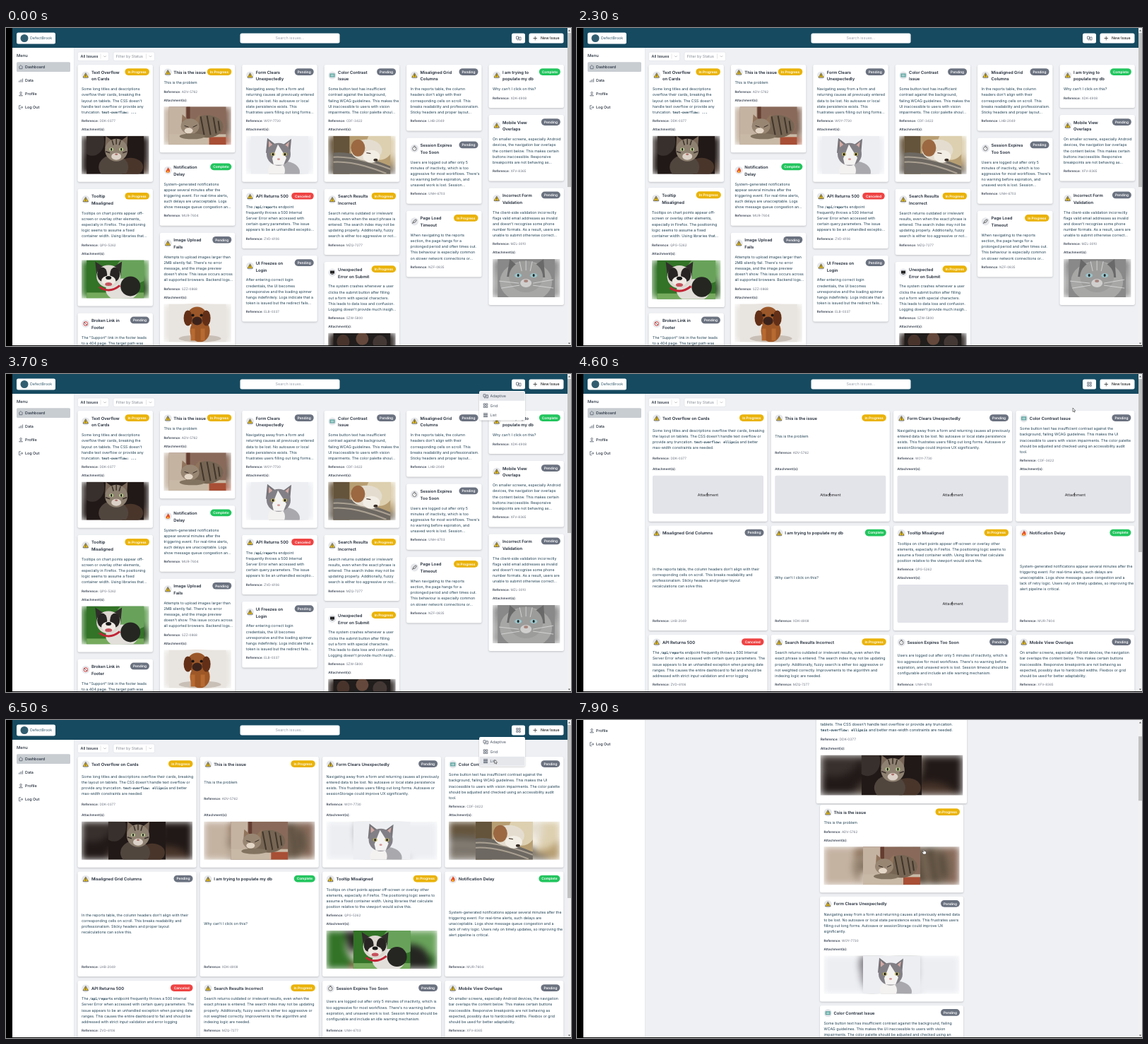
Write an HTML page that moves like this. It is 800x450 px and loops after 8 s.

```html
<!DOCTYPE html>
<html lang="en">
<head>
<meta charset="utf-8">
<title>Issue dashboard</title>
<style>
html, body { margin: 0; width: 100%; height: 100%; overflow: hidden; background: #000; }
svg { display: block; }
text { font-family: Inter, "Open Sans", sans-serif; text-rendering: geometricPrecision; white-space: pre; }
.mono { font: bold 4.6px "DejaVu Sans Mono", monospace; }
.box { fill: #fff; filter: drop-shadow(0 1px 1.2px #0003); }
.blur { filter: blur(5px); }
</style>
</head>
<body>
<script>
const INK = '#1d3f52', DARK = '#1f2937';
const rect = (x, y, w, h, fill, more = '') =>
  `<rect x="${x}" y="${y}" width="${w}" height="${h}" fill="${fill}" ${more}/>`;
const oval = (x, y, rx, ry, fill) => `<ellipse cx="${x}" cy="${y}" rx="${rx}" ry="${ry}" fill="${fill}"/>`;
const path = (d, fill) => `<path d="${d}" fill="${fill}"/>`;
const line = (d, color = '#4b5563', width = .7) =>
  `<path d="${d}" fill="none" stroke="${color}" stroke-width="${width}"/>`;
const text = (x, y, s, size, fill = DARK, weight = 400, anchor = 'start') =>
  `<text x="${x}" y="${y + size * .36}" font-size="${size}" fill="${fill}" font-weight="${weight}" text-anchor="${anchor}">${s}</text>`;
const at = (x, y, s) => `<g transform="translate(${x} ${y})">${s}</g>`;

// title, text, reference, status, icon, photo; breaks: | adaptive, ^ grid, ~ list, … adaptive cut
const issues = [
  ['Text Overflow |on Cards', "Some long titles and descriptions |overflow their cards, breaking ^the |layout on ~tablets. The CSS doesn't |handle text overflow or ^provide any |truncation. ~`text-overflow: …ellipsis` and better ^max-width constraints are needed.", 'DDK-0377', 'I', 'warn', 'tabby'],
  ['This is the issue', 'This is the problem', 'ADV-5762', 'I', 'warn', 'kitten'],
  ['Form Clears |Unexpectedly', 'Navigating away from a form and |returning causes all previously ^entered |data ~to be lost. No autosave or local |state persistence ^exists. This |frustrates users ~filling out long forms…. Autosave or ^sessionStorage could improve UX ~significantly.', 'WOY-7730', 'P', 'warn', 'white'],
  ['Color Contrast |Issue', 'Some button text has insufficient |contrast against the ^background, |failing ~WCAG guidelines. This makes the |UI ^inaccessible to users with vision |~impairments. The color palette ^shoul…d be adjusted and checked using an ~accessibility audit ^tool.', 'CDF-3422', 'P', 'board', 'sleeper'],
  ['Misaligned Grid |Columns', "In the reports table, the column |headers don't align with their ^|corresponding cells on scroll. This |breaks readability and ^professionalism. |Sticky headers and proper layout… ^recalculations can solve this.", 'LHB-2049', 'P', 'warn'],
  ['I am trying to |populate my db', "Why can't I click on this?", 'XDK-4908', 'C', 'warn'],
  ['Tooltip |Misaligned', 'Tooltips on chart points appear off-|screen or overlay other ^elements, |especially in Firefox. The positioning |logic seems to ^assume a fixed |container width. Using libraries that… calculate ^position relative to the viewport would solve this.', 'QPG-5262', 'I', 'warn', 'bulldog'],
  ['Notification |Delay', 'System-generated notifications |appear several minutes after the ^|triggering event. For real-time alerts, |such delays are ^unacceptable. Logs |show message queue congestion an…d a ^lack of retry logic. Users rely on timely updates, so improving the ^alert pipeline is critical.', 'MUR-7604', 'C', 'fire'],
  ['API Returns 500', 'The `/api/reports` endpoint |frequently throws a 500 Internal ^|Server Error when accessed with |certain query parameters. The ^issue |appears to be an unhandled exceptio…n when parsing date ^ranges. This causes the entire dashboard to fail and should be ^addressed with strict input validation and error logging', 'ZVD-6106', 'X', 'warn'],
  ['Search Results |Incorrect', 'Search returns outdated or irrelevant |results, even when the ^exact phrase is |entered. The search index may not be |updating ^properly. Additionally, fuzzy |search is either too aggressive or ^not… weighted correctly. Improvements to the algorithm and ^indexing logic are needed.', 'MZQ-7277', 'I', 'warn'],
  ['Session Expires |Too Soon', "Users are logged out after only 5 |minutes of inactivity, which is ^too |aggressive for most workflows. There's |no warning before ^expiration, and |unsaved work is lost. Session… timeout should be ^configurable and include an idle warning mechanism.", 'UNH-6703', 'P', 'clock'],
  ['Mobile View |Overlaps', 'On smaller screens, especially Android |devices, the navigation ^bar overlaps |the content below. This makes certain |buttons ^inaccessible. Responsive |breakpoints are not behaving as… ^expected, possibly due to hardcoded widths. Flexbox or grid ^should be used for better adaptability.', 'XFV-8365', 'P', 'warn'],
  ['Image Upload |Fails', "Attempts to upload images larger than |2MB silently fail. There's no error |message, and the image preview |doesn't show. This issue occurs across |all supported browsers. Backend logs…", 'SZZ-0868', 'P', 'warn', 'puppy'],
  ['UI Freezes on |Login', 'After entering correct login |credentials, the UI becomes |unresponsive and the loading spinner |hangs indefinitely. Logs indicate that a |token is issued but the redirect fails…', 'ELB-0337', 'P', 'warn'],
  ['Page Load |Timeout', 'When navigating to the reports |section, the page hangs for a |prolonged period and often times out. |This behaviour is especially common |on slower network connections or…', 'NZF-0835', 'I', 'pen'],
  ['Incorrect Form |Validation', "The client-side validation incorrectly |flags valid email addresses as invalid |and doesn't recognise some phone |number formats. As a result, users are |unable to submit otherwise correct…", 'MZL-3010', 'P', 'warn', 'grey'],
  ['Broken Link in |Footer', 'The "Support" link in the footer leads |to a 404 page. The target path was |moved', 'BLF-4040', 'P', 'ban'],
  ['Unexpected |Error on Submit', "The system crashes whenever a user |clicks the submit button after filling |out a form with special characters. |This leads to data loss and confusion. |Logging doesn't provide much insigh…", 'SZW-5800', 'I', 'screen', 'group'],
];
const statuses = {
  I: ['In Progress', '#eab308', 34.5], P: ['Pending', '#6b7280', 27],
  C: ['Complete', '#22c55e', 30], X: ['Canceled', '#ef4444', 31.5],
};
const icons = {
  warn: '<path d="M0-3.3L3.6 3H-3.6Z" fill="#facc15" stroke="#444" stroke-width=".7"/>' + rect(-.4, -1.3, .8, 2.3, '#222') + rect(-.4, 1.5, .8, .8, '#222'),
  fire: path('M0-4C3-1 3 0 2.6 2 2 4-2 4-2.6 2-3 0-1 0 0-4', '#ea4a1f') + oval(0, 2, 1.2, 1.5, '#fbbf24'),
  board: rect(-3.5, -2.5, 7, 5, '#4b9a94') + rect(-2.4, -1.3, 4.8, 1, '#d5eceb') + rect(-2.4, .4, 4.8, 1, '#d5eceb'),
  clock: '<circle r="2.7" cy=".4" fill="#fff" stroke="#555" stroke-width=".8"/>' + line('M0 .4L1.2-.7M-1-3.3H1', '#333'),
  pen: line('M-3 3L-1-1 2-3 3-2 1 1-2 2', '#555', .9),
  ban: '<circle r="2.7" fill="#fff" stroke="#d33" stroke-width="1"/>' + line('M-2-2L2 2', '#333', .9),
  screen: rect(-3, -2.6, 6, 4, '#222') + rect(-1.5, 2, 3, .9, '#555'),
};

const ground = fill => rect(0, 0, 81, 54, fill);
const photos = {
  tabby: ground('#211917') + oval(8, 8, 17, 20, '#38302d') + oval(62, 44, 18, 13, '#49352a') + oval(38, 44, 21, 17, '#51463e') +
    path('M26 17L27 0 38 8 47 8 58 0 57 18', '#776657') + oval(42, 20, 16, 16, '#8e8171') + line('M36 6L38 13M42 4V12M48 6L46 13M27 22L33 24M57 22L51 24', '#3a302a', 1.5) +
    oval(35, 19, 3, 2.5, '#b5c58c') + oval(49, 19, 3, 2.5, '#b5c58c') + oval(35, 19, 1, 2, '#111') + oval(49, 19, 1, 2, '#111') +
    oval(42, 29, 7, 5, '#ddd2c8') + oval(42, 26, 2, 1.3, '#a96f68'),
  kitten: ground('#896a5a') + rect(0, 0, 24, 40, '#c5b3a2') + rect(25, 0, 5, 30, '#643d31') + rect(0, 39, 81, 15, '#c8b9a6') + rect(57, 43, 24, 11, '#a84f36') +
    oval(54, 28, 23, 16, '#766553') + line('M45 14L50 40M54 13L59 40M63 15L67 38M70 20L72 34', '#40362c', 2) +
    path('M18 25L19 11 27 18 37 18 44 11 42 28', '#91745c') + oval(30, 28, 13, 11, '#988673') + line('M22 27L28 29M34 29L40 26', '#352b24', 1) + oval(28, 34, 6, 4, '#e5d7c7') + oval(33, 42, 18, 4, '#81735f'),
  white: ground('#eceef2') + oval(47, 51, 22, 15, '#a9a9ad') + oval(36, 49, 12, 12, '#f4f2f0') + path('M21 24L23 3 36 13 46 12 57 4 55 27', '#77757a') + path('M25 16L25 7 32 14M47 14L54 8 52 19', '#d4a9a4') +
    oval(39, 26, 17, 16, '#828086') + path('M38 12L30 32 32 41 46 41 50 31Z', '#f5f3f2') + oval(31, 26, 3, 2.4, '#b6aa62') + oval(48, 26, 3, 2.4, '#b6aa62') + oval(31, 26, 1.2, 1.8, '#111') + oval(48, 26, 1.2, 1.8, '#111') + oval(39, 33, 2, 1.4, '#d49a98'),
  sleeper: ground('#b79e72') + rect(0, 0, 23, 54, '#65543c') + oval(66, 12, 19, 22, '#ddd0b0') + path('M0 24Q25 20 81 43V54H0Z', '#6d6861') + line('M0 30Q30 28 81 47M0 37Q30 35 75 53', '#aaa092', 2) +
    oval(47, 20, 22, 15, '#e4ddcf') + oval(35, 17, 10, 12, '#9b6842') + oval(54, 29, 12, 9, '#f3eee5') + oval(60, 34, 3, 2, '#393029') + line('M47 24L53 25', '#493d34', 1.2),
  bulldog: ground('#327327') + oval(67, 13, 25, 20, '#68a25a') + rect(0, 46, 81, 8, '#75aa5d') + oval(50, 42, 23, 16, '#e2dfda') + oval(62, 37, 14, 14, '#252622') +
    path('M14 19L12 2 23 9 39 9 50 2 48 24', '#302d2a') + oval(31, 23, 17, 16, '#ddd7d0') + oval(22, 20, 7, 10, '#272423') + oval(40, 20, 7, 10, '#272423') + oval(31, 29, 10, 7, '#f0e9e3') + oval(31, 25, 4, 2.5, '#171717') + oval(31, 34, 5, 2.5, '#c6525d') + line('M18 38Q32 48 47 36', '#c22435', 3),
  puppy: ground('#e8e4df') + oval(44, 49, 30, 5, '#c8c0b7') + oval(44, 38, 14, 16, '#9e5726') + rect(31, 35, 6, 17, '#b76a31') + rect(45, 35, 6, 17, '#b76a31') + oval(40, 18, 14, 14, '#9b5729') + oval(27, 20, 6, 11, '#633017') + oval(53, 20, 6, 11, '#633017') + oval(40, 24, 7, 6, '#3b231b') + oval(34, 16, 2, 2, '#191414') + oval(46, 16, 2, 2, '#191414'),
  grey: ground('#898989') + oval(40, 32, 37, 29, '#a7a7a6') + path('M13 25L17 0 32 13 48 12 65 0 67 26', '#696969') + oval(40, 25, 24, 22, '#9c9c9b') + line('M31 3L34 17M40 2V16M49 3L46 17M2 31L30 34M5 41L31 37M50 34L79 29M50 37L79 41', '#ddd', .8) + oval(29, 23, 5, 3, '#9ac6cc') + oval(51, 23, 5, 3, '#9ac6cc') + oval(29, 23, 1.5, 2, '#222') + oval(51, 23, 1.5, 2, '#222') + oval(40, 34, 8, 6, '#d0cfce') + oval(40, 31, 3, 2, '#a8877f'),
  group: ground('#201d1c') + oval(14, 12, 9, 10, '#49342c') + oval(41, 8, 9, 9, '#64483b') + oval(66, 13, 10, 10, '#443835') + rect(30, 17, 25, 30, '#263c46'),
};

const cut = (s, view) => {
  s = view ? s.replace('…', '') : s.replace(/….*/, '...');
  return s.replace(/[|^~]/g, m => m == '|^~'[view] ? '\n' : '').split('\n');
};
const mono = s => s.replace(/`([^`]*)`?/g, '<tspan class="mono">$1</tspan>');

function photo(name, x, y, w, view) {
  const wait = view == 1 ? `<g class="wait">${rect(x, y, w, 54, '#e3e4ea', 'rx="2"')}${text(x + w / 2, y + 27, 'Attachment', 5.4, '#222', 400, 'middle')}${path(`M${x + w / 2} ${y + 23.5}q-4 3 0 7q-2-3.500 0-7`, '#111')}</g>` : '';
  return `${wait}<svg class="photo" x="${x}" y="${y}" width="${w}" height="54">
    <use href="#${name}-wide" width="${w}" height="54" class="blur"/>
    <use href="#${name}" x="${w / 2 - 40.7}" width="81.400" height="54"/></svg>`;
}

const centres = {};
function card(i, view, x, y, w, h) {
  const [title, body, ref, status, icon, pic] = issues[i];
  const heads = cut(title, view), rows = cut(body, view), top = heads.length > 1 ? 34.5 : 25.5;
  const refTop = top + 8.1 * (rows.length - 1) + 12.5, natural = refTop + (pic ? 86.3 : 14);
  h = h || natural;
  const slack = h - natural, bodyY = y + top + slack / (pic ? 3 : 2), refY = y + refTop + slack * (pic ? 2 / 3 : 1);
  const [label, color, bw] = statuses[status], id = `c${view}-${i}`, right = x + w - 5;
  centres[id] = [x + w / 2, y + h / 2];
  const svg = `<g id="${id}"><rect class="box" x="${x}" y="${y}" width="${w}" height="${h}" rx="2.500"/>` +
    at(x + 11.3, y + (heads.length > 1 ? 15 : 10.8), oval(0, 0, 5.6, 5.6, '#e5e7eb') + icons[icon]) +
    heads.map((s, k) => text(x + 19.4, y + 10.5 + k * 9.8, s, 5.9, DARK, 600)).join('') +
    rect(right - bw, y + 5.2, bw, 9.7, color, 'rx="4.850"') + text(right - bw / 2, y + 10.1, label, 4.8, '#fff', 600, 'middle') +
    rows.map((s, k) => text(x + 5.5, bodyY + k * 8.1, mono(s), 5.25, INK)).join('') +
    text(x + 5.5, refY, `<tspan font-weight="600" fill="#374151">Reference:</tspan> ${ref}`, 4.6, '#6b7280') +
    (pic ? text(x + 5.5, y + h - 74.3, 'Attachment(s):', 4.6, '#374151', 600) + photo(pic, x + 5.5, y + h - 65, w - 11, view) : '') + '</g>';
  return { svg, h };
}

function stack(ids, view, x, w, gap) {
  let y = 52;
  return ids.map(i => { const c = card(i, view, x, y, w); y += c.h + gap; return c.svg; }).join('');
}
const adaptive = [[0, 6, 16], [1, 7, 12], [2, 8, 13], [3, 9, 17], [4, 10, 14], [5, 11, 15]]
  .map((ids, k) => stack(ids, 0, 101.5 + 116.4 * k, 106.4, 10)).join('');
const gridRows = [[52, 156.7], [214.5, 148.6], [369, 84.4]];
const grid = issues.slice(0, 12).map((_, i) => card(i, 1, 101.5 + 173.3 * (i % 4), gridRows[i >> 2][0], 168, gridRows[i >> 2][1]).svg).join('');
const list = stack([0, 1, 2, 3], 2, 344, 203, 5.5);

const viewIcons = [
  line('M-3-2.500H0V1H-3ZM1-1.500H3.500V2.500H1ZM-2 2.500H0'),
  line('M-2.800-2.800H-.6V-.6H-2.800ZM.6-2.800H2.800V-.6H.6ZM-2.800 .6H-.6V2.800H-2.800ZM.6 .6H2.800V2.800H.6Z'),
  line('M-3-2.300H3M-3-.7H3M-3 .9H3M-3 2.500H3', '#4b5563', .9),
];
const chevron = x => line(`M${x - 1.7} 39.300l1.700 1.700 1.700-1.700`, '#aaa') + line(`M${x - 6} 36.500V43.500`, '#ccc', .5);
const pill = (x, w) => rect(x, 34, w, 12.3, '#fff', 'rx="2" stroke="#d8dbe0" stroke-width=".5"');
const white = (x, y, w, h) => rect(x, y, w, h, '#fff', 'rx="2.500"');
const side = [
  ['Dashboard', 'M-2.700 0L0-2.700 2.700 0M-2-.5V2.500H2V-.5'], ['Data', 'M-2.500 2.500V.5M-.8 2.500V-.8M.9 2.500V-1.500M2.600 2.500V-2.700'],
  ['Profile', 'M-2.500 2.700Q0-.8 2.500 2.700ZM-1.300-1.400a1.300 1.300 0 1 0 2.600 0a1.300 1.300 0 1 0-2.600 0'], ['Log Out', 'M0-2.500H-2.500V2.500H0M-1 0H2.700L1-1.600M2.700 0L1 1.600'],
].map(([s, d], k) => at(21, 55.2 + 19 * k, line(d)) + text(27, 55.2 + 19 * k, s, 5.4, DARK, 500)).join('');

const symbol = (id, s, fit) => `<symbol id="${id}" viewBox="0 0 81 54" preserveAspectRatio="xMidYMid ${fit}">${s}</symbol>`;
document.body.innerHTML = `<svg width="800" height="450" viewBox="0 0 800 450">
<defs>${Object.entries(photos).map(([k, s]) => symbol(k, s, 'meet') + symbol(k + '-wide', s, 'slice')).join('')}</defs>
${rect(9, 0, 791, 450, '#eef0f4')}
<g id="page">
  ${rect(9, 0, 87, 2000, '#fff')}${rect(96, 0, .5, 2000, '#dfe2e7')}
  <g id="v0">${adaptive}</g><g id="v1">${grid}</g><g id="v2">${list}</g>
  ${rect(9, 0, 786, 28, '#164a60')}
  ${white(15, 6.5, 55, 16)}${oval(26, 14.5, 5.5, 5.5, '#315d70')}${text(34, 14.5, 'DefectBrook', 5.3, '#31596b')}
  ${white(331.5, 7.5, 141, 14)}${text(402, 14.5, 'Search issues...', 5.5, '#9ca3af', 400, 'middle')}
  ${white(716, 7.5, 19, 14)}${viewIcons.map((s, k) => `<g id="i${k}">${at(725.5, 14.5, s)}</g>`).join('')}
  ${white(740.5, 7.5, 49, 14)}${line('M746.500 14.500h5.500m-2.750-2.750v5.500', '#222')}${text(757, 14.5, 'New Issue', 5.4, '#222', 500)}
  ${text(15, 38.5, 'Menu', 5.8, DARK, 500)}${rect(15, 48.3, 76, 13.7, '#c8cdd2', 'rx="1.500"')}${side}
  ${pill(101.5, 44)}${text(105.5, 40.2, 'All Issues', 5.5, DARK, 500)}${chevron(140)}
  ${pill(152, 58.5)}${text(155.8, 40.2, 'Filter by Status', 5.4, '#858b94')}${chevron(204.5)}
  <g id="menu"><rect class="box" x="670" y="24" width="65" height="41.500" rx="2"/>
    <rect id="mark" x="670.500" y="25" width="64" height="12.800" fill="#e5e7eb"/>
    ${['Adaptive', 'Grid', 'List'].map((s, k) => at(679, 31.3 + 13.4 * k, viewIcons[k]) + text(685.5, 31.3 + 13.4 * k, s, 5.4, '#4b5563')).join('')}</g>
</g>
${rect(795, 0, 5, 450, '#f1f1f1')}<rect id="thumb" x="795" width="5" fill="#c1c1c1"/>
${path('M796 4.500L797.500 2.500 799 4.500ZM796 445.500L797.500 447.500 799 445.500Z', '#555')}
${rect(0, 449, 800, 1, '#111')}${rect(0, 0, 9, 450, '#000')}
<g id="cursor" stroke="#333" stroke-width=".6" fill="#fff"><path id="arrow" d="M0 0V5.500L1.300 4.300 2.200 6.200 3 5.800 2.200 4H3.900Z"/>
<path id="hand" d="M-.7 0q.7-.8 1.400 0V2.400L3.400 3V5.500L2.700 7H-.6L-2.400 4.300-1.700 3.500-.7 4.200Z"/></g>
</svg>`;

const el = id => document.getElementById(id);
const show = (node, on) => { node.style.display = on ? '' : 'none'; };
const ease = (t, from, to) => {
  const k = Math.min(1, Math.max(0, (t - from) / (to - from)));
  return k * k * (3 - 2 * k);
};
const hovers = [['c0-6', 2215, 2440], ['c0-7', 2440, 2570], ['c0-2', 2570, 2700], ['c0-3', 2700, 2820], ['c0-4', 2820, 2920], ['c2-0', 7560, 9000]];
const trail = [[4200, 690, 45], [4400, 703, 49], [4600, 702, 48], [5400, 711, 33], [5700, 722, 16], [5900, 700, 31], [6200, 692, 55], [6400, 692, 55], [6800, 690, 62], [7200, 690, 62], [7500, 690, 62], [7700, 491, 183], [8000, 491, 183]];
const waits = document.querySelectorAll('.wait'), gridPhotos = document.querySelectorAll('#v1 .photo');

function draw() {
  const t = performance.now() % 8000;
  const view = t < 4200 ? 0 : t < 7100 ? 1 : 2, loaded = t >= 4800;
  for (let k = 0; k < 3; k++) {
    show(el('v' + k), k == view);
    show(el('i' + k), k == view);
  }
  waits.forEach(n => show(n, !loaded));
  gridPhotos.forEach(n => show(n, loaded));

  for (const [id, on, off] of hovers) {
    const s = 1 + .05 * (ease(t, on, on + 200) - ease(t, off, off + 200)), [x, y] = centres[id];
    el(id).setAttribute('transform', `translate(${x} ${y}) scale(${s}) translate(${-x} ${-y})`);
  }

  show(el('menu'), t >= 3400 && t < 4200 || t >= 5700 && t < 7100);
  const row = t < 3900 ? 0 : t < 4200 ? 1 : t < 6000 ? 0 : t < 6100 ? 1 : 2;
  el('mark').setAttribute('y', 25 + 13.4 * row);
  show(el('mark'), t >= 3500 && t < 4200 || t >= 5850);

  const scroll = 78 * ease(t, 7450, 7880);
  el('page').setAttribute('transform', `translate(0 ${-scroll})`);
  el('thumb').setAttribute('y', 7 + scroll * .208);
  el('thumb').setAttribute('height', [218, 245, 91][view]);

  show(el('cursor'), t >= 4200);
  const k = Math.max(1, trail.findIndex(p => p[0] > t)), [t0, x0, y0] = trail[k - 1], [t1, x1, y1] = trail[k];
  const f = ease(t, t0, t1);
  el('cursor').setAttribute('transform', `translate(${x0 + (x1 - x0) * f} ${y0 + (y1 - y0) * f})`);
  show(el('arrow'), t < 7600);
  show(el('hand'), t >= 7600);
  requestAnimationFrame(draw);
}
draw();
</script>
</body>
</html>
```
